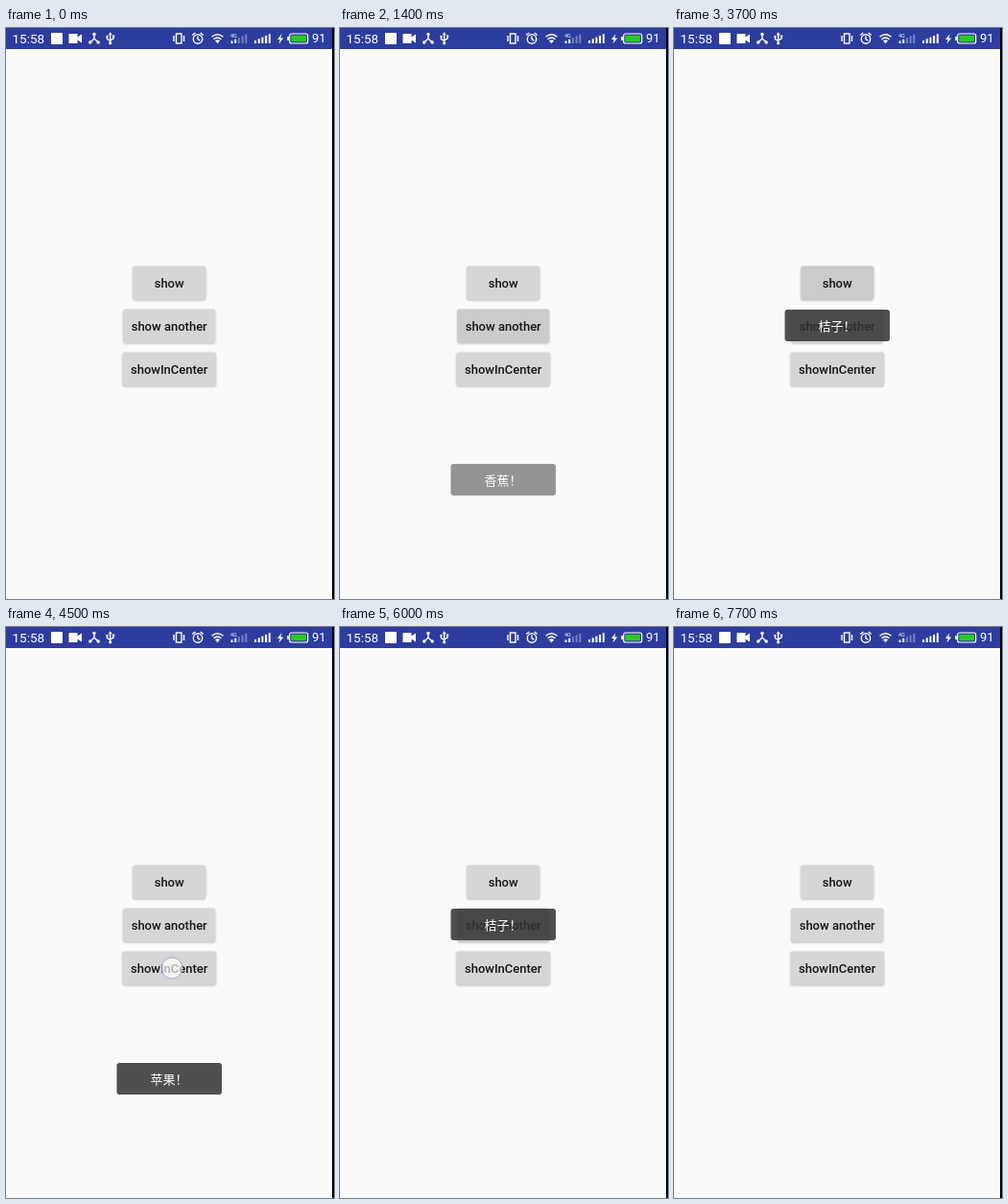
An HTML page for the animation above (8100 ms loop, 342x596 px).

```html
<!DOCTYPE html>
<html lang="zh-CN">
<head>
<meta charset="utf-8">
<title>Toast demo</title>
<style>
  html, body { margin: 0; width: 100%; height: 100%; overflow: hidden; background: #fafafa; }
  svg { display: block; width: 342px; height: 596px; }
  text { font-family: Roboto, "Noto Sans CJK SC", "Noto Sans CJK", sans-serif; }
  .label { font-size: 13px; font-weight: 500; fill: #151515; text-anchor: middle; }
  .toast text { font: 500 13px "Noto Sans CJK SC", "Noto Sans CJK", sans-serif; fill: #fff; text-anchor: middle; }
  .status { font-size: 13.5px; fill: #fff; }
  .line { fill: none; stroke: #fff; stroke-width: 1.4; }
  .button rect { filter: drop-shadow(0 1px 1px rgba(0, 0, 0, .25)); }
</style>
</head>
<body>
<svg viewBox="0 0 342 596">
  <rect width="342" height="596" fill="#fafafa"/>
  <rect width="342" height="22" fill="#2d3d9f"/>

  <g class="status">
    <text x="6.5" y="15.5">15:58</text>
    <text x="319" y="15.3" font-size="13">91</text>
  </g>

  <g fill="#fff">
    <rect x="47" y="5" width="12" height="12" rx="1"/>
    <path d="M66 6h8.500v3.500l4.500-3v9l-4.500-3v3.500h-9v-9z"/>
    <path class="line" d="M92 6v5l-4 4M92 11l4 4"/>
    <circle cx="92" cy="6.500" r="1.700"/>
    <circle cx="87.800" cy="15" r="1.700"/>
    <circle cx="96.200" cy="15" r="1.700"/>
    <path class="line" stroke-width="1.200" d="M108.700 6v10M105.500 9v2.500l3.200 2M112 8.500v2.500l-3.300 2"/>
    <path d="M106.700 7.200l2-3 2 3z"/>
    <circle cx="108.700" cy="15.800" r="1.600"/>
    <circle cx="105.500" cy="9" r="1.200"/>
    <rect x="111" y="7.500" width="2.200" height="2.200"/>
  </g>

  <g class="line">
    <rect x="177.500" y="6" width="5.500" height="10"/>
    <path d="M175 8v6M185.500 8v6"/>
    <circle cx="200" cy="11.500" r="4.700"/>
    <path d="M200 8.500v3.200l2.300 1.500M194.300 7.500l3-2.500M205.700 7.500l-3-2.500"/>
    <path d="M214.500 9.300Q220.500 4.200 226.500 9.300M216.500 11.700Q220.500 8.300 224.500 11.700"/>
  </g>
  <path d="M218 13.300Q220.500 11.200 223 13.300L220.500 16.300z" fill="#fff"/>

  <text x="234" y="9.500" font-size="5.500" fill="#fff">4G</text>
  <g id="signal"></g>
  <path d="M287.500 6l-4.500 6h2.700l-1.200 4.500 4.700-6h-2.900z" fill="#fff"/>
  <rect x="295.700" y="6" width="19" height="10" rx="2" fill="#2d3d9f" stroke="#fff" stroke-width="1.200"/>
  <rect x="297.400" y="7.700" width="15.600" height="6.600" rx=".6" fill="#27cc1b"/>
  <rect x="293.200" y="9" width="2" height="4" rx=".5" fill="#fff"/>

  <g id="buttons"></g>
  <g id="toast" class="toast">
    <rect x="115.500" y="-16.500" width="109.500" height="33" rx="3" fill="#323232" fill-opacity=".85"/>
    <text x="170" y="5"></text>
  </g>
  <circle id="touch" r="11" fill="#fff" fill-opacity=".68" stroke="#8d98c4" stroke-opacity=".75" stroke-width="1"/>
  <rect x="340" width="2" height="596" fill="#000"/>
</svg>

<script>
const LOOP = 8100, STEP = 100;
const CLEAR = 7700, LAST_TOUCH = 7500;
const $ = id => document.getElementById(id);

function add(parent, tag, attrs, text = '') {
  const el = document.createElementNS('http://www.w3.org/2000/svg', tag);
  for (const key in attrs) el.setAttribute(key, attrs[key]);
  el.textContent = text;
  parent.append(el);
  return el;
}

const actions = [
  { label: 'show', w: 76, y: 266, message: '苹果！', toastY: 471.5 },
  { label: 'show another', w: 96, y: 311, message: '香蕉！', toastY: 471.5 },
  { label: 'showInCenter', w: 97.5, y: 356, message: '桔子！', toastY: 310.5 }
];

for (const a of actions) {
  const group = add($('buttons'), 'g', { class: 'button' });
  a.face = add(group, 'rect', { x: 170.2 - a.w / 2, y: a.y - 17.5, width: a.w, height: 35, rx: 2 });
  add(group, 'text', { class: 'label', x: 170.2, y: a.y + 4.7 }, a.label);
}

// Two reception meters; the first has only two lit bars.
for (const [x, lit] of [[234.5, 2], [259, 5]]) {
  for (let i = 0; i < 5; i++) {
    const h = (lit === 2 ? 2.5 : 3) + i * 1.7;
    add($('signal'), 'rect', {
      x: x + i * 3.7, y: 16 - h, width: 2, height: h,
      fill: '#fff', 'fill-opacity': i < lit ? 1 : .35
    });
  }
}

// Each tap: start, end of the toast's fade-in, button index.
const taps = [
  [100, 600, 0], [1000, 1600, 1], [2200, 2800, 2],
  [3500, 4100, 0], [4500, 5000, 2], [5800, 6400, 1]
].map(([start, end, i]) => ({ start, end, action: actions[i] }));

const clamp = v => Math.max(0, Math.min(1, v));

function drawToast(action, alpha) {
  const toast = $('toast');
  toast.setAttribute('opacity', alpha);
  if (!action) return;
  toast.setAttribute('transform', `translate(0 ${action.toastY})`);
  toast.lastElementChild.textContent = action.message;
}

function drawTouch(x, y, visible) {
  const touch = $('touch');
  touch.setAttribute('cx', x);
  touch.setAttribute('cy', y);
  touch.setAttribute('opacity', visible ? 1 : 0);
}

function pressAt(t, tap) {
  return clamp((t - tap.start) / 200) * clamp((tap.end - t) / 200);
}

function render(t) {
  const index = taps.findLastIndex(tap => t >= tap.start);
  const tap = taps[index], previous = taps[index - 1];

  for (const a of actions) {
    const press = tap && tap.action === a ? pressAt(t, tap) : 0;
    const shade = Math.round(214 - 11 * press);
    a.face.setAttribute('fill', `rgb(${shade},${shade},${shade})`);
  }

  if (!tap || t >= CLEAR) {
    drawToast(null, 0);
    drawTouch(0, 0, false);
    return;
  }

  const swap = tap.end - 300;
  if (t >= swap) drawToast(tap.action, clamp(.25 + (t - swap) / 290));
  else drawToast(previous && previous.action, previous ? 1 : 0);

  if (t >= LAST_TOUCH) drawTouch(192.5, 170.5, true);
  else drawTouch(173, tap.action.y, t < swap - 100);
}

const began = performance.now();
function tick() {
  const t = (performance.now() - began) % LOOP;
  render(Math.floor(t / STEP) * STEP);
  requestAnimationFrame(tick);
}
render(0);
requestAnimationFrame(tick);
</script>
</body>
</html>
```
